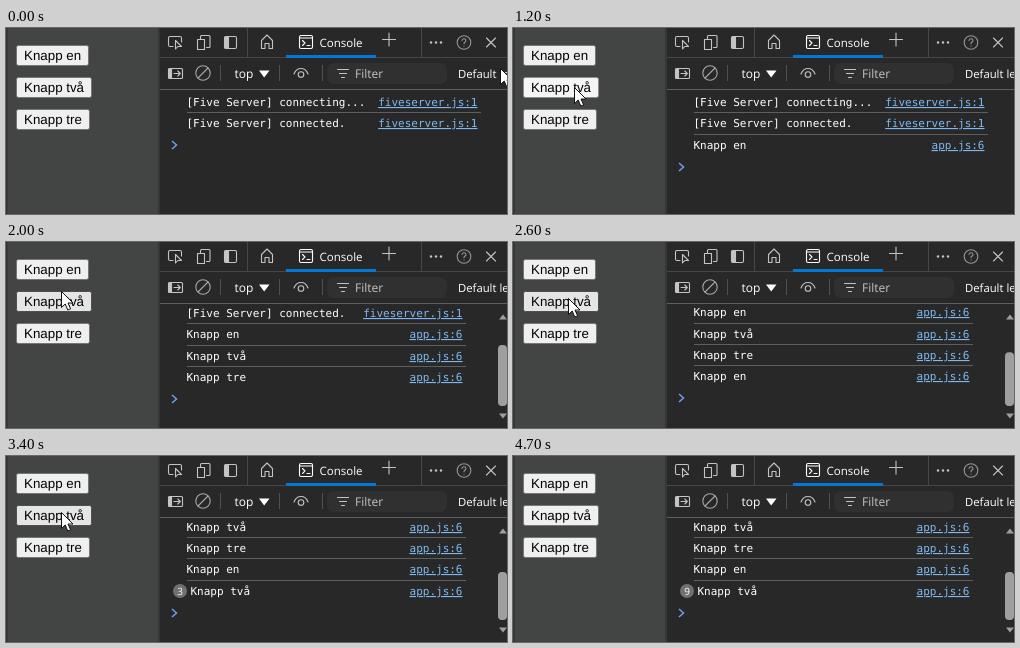
An HTML page for the animation above (5400 ms loop, 501 px wide and 186 px high).

```html
<!DOCTYPE html>
<html lang="sv">
<head>
<meta charset="utf-8">
<title>Knappar och konsol</title>
<style>
  html, body { margin: 0; width: 100%; height: 100%; overflow: hidden; background: #282828; }
  svg { display: block; width: 501px; height: 186px; }
  text { text-rendering: geometricPrecision; white-space: pre; }
  .ui { font-family: "Open Sans", "Noto Sans", sans-serif; fill: #fff; }
  .mono { font: 11px "DejaVu Sans Mono", monospace; fill: #fff; }
  .link { fill: #7db8f0; text-decoration: underline; text-anchor: end; }
  .btn { font: 13.333px "Liberation Sans", Arial, sans-serif; }
  .icon { fill: none; stroke: #c4c4c4; stroke-width: 1.1; stroke-linecap: round; stroke-linejoin: round; }
</style>
</head>
<body>
<svg viewBox="0 0 501 186">
  <clipPath id="view"><rect x="154" y="62" width="347" height="124"/></clipPath>

  <rect width="153" height="186" fill="#434444"/>
  <rect width="2" height="186" fill="#383838"/>
  <rect x="152" width="2" height="186" fill="#363636"/>
  <rect x="154" width="347" height="186" fill="#282828"/>

  <!-- tab bar -->
  <path d="M154 29.5H501M241.500 0V29M415.500 0V29" stroke="#474747"/>
  <path d="M154 61.5H501" stroke="#5e5e5e"/>
  <rect x="280" y="27" width="90" height="3" fill="#0078d4"/>
  <path d="M214.500 37V53M273.500 37V53M316.500 37V53" stroke="#505050"/>
  <g class="icon">
    <path d="M167 18.500H164Q162.500 18.500 162.500 17V10Q162.500 8.500 164 8.500H174Q175.500 8.500 175.500 10V14M169.500 12.500V21L171.800 18.500H175.500Z"/>
    <path d="M194.500 11V8.500Q194.500 7.500 195.500 7.500H203Q204 7.500 204 8.500V18.500Q204 19.500 203 19.500H200.500M191.500 11.500H198.500V21.500H191.500Z"/>
    <rect x="218.500" y="8.500" width="12" height="12" rx="1.500"/>
    <path d="M219 9H222.500V20H219Z" fill="#c4c4c4"/>
    <path d="M255.500 20.500V12.500L261 7L266.500 12.500V20.500H263V15.500H259V20.500Z"/>
    <path d="M293.500 9Q293.500 7.500 295 7.500H305Q306.500 7.500 306.500 9V19Q306.500 20.500 305 20.500H295Q293.500 20.500 293.500 19ZM293.500 10H306.500M296.500 12.500L299 15L296.500 17.500M301 17.500H304" stroke="#fff"/>
    <path d="M376.500 11.500H389.500M383 5V18"/>
    <g stroke="#969696">
      <circle cx="458" cy="14.500" r="6.800"/>
      <path d="M456 12.500Q456.200 10.800 458 10.800Q460 10.800 460 12.600Q460 13.600 458.800 14.300Q458 14.900 458 15.800M458 18V18.100"/>
    </g>
    <path d="M480.500 10L489.500 19M489.500 10L480.500 19"/>
  </g>
  <g fill="#c4c4c4">
    <circle cx="425" cy="14.500" r="1.200"/><circle cx="430" cy="14.500" r="1.200"/><circle cx="435" cy="14.500" r="1.200"/>
  </g>
  <text class="ui" x="313.500" y="18.500" font-size="11.500">Console</text>

  <!-- filter bar -->
  <rect x="321" y="35" width="120" height="21" rx="7" fill="#303030"/>
  <g class="icon">
    <rect x="162.500" y="40.500" width="14" height="10" rx="1"/>
    <path d="M163 41H165.500V50H163Z" fill="#c4c4c4"/>
    <path d="M168 45.500H174M171.800 43L174.300 45.500L171.800 48"/>
    <g stroke="#a8a8a8"><circle cx="197" cy="45" r="7.200"/><path d="M192 50L202 40"/></g>
    <path d="M288 46Q290 40.500 295 40.500T302 46"/><circle cx="295" cy="46.500" r="2.800"/>
    <path d="M331.500 41.500H342.500M333.500 45.500H340.500M335.500 49.500H338.500"/>
  </g>
  <path d="M253 42.500H263.500L258.200 49.500Z" fill="#fff"/>
  <g class="ui">
    <text x="228.500" y="49.500" font-size="12">top</text>
    <text x="349" y="49.500" font-size="12" fill="#c4c4c4">Filter</text>
    <text x="452" y="49.500" font-size="11.300">Default levels</text>
  </g>

  <g id="buttons"></g>
  <g id="console" clip-path="url(#view)"></g>
  <path id="cursor" d="M.5 .5V16.500L4.200 13L6.800 19L9.600 17.800L7 12H12Z" fill="#fff" stroke="#111"/>
</svg>
<script>
const LOOP = 5400, STEP = 100, PITCH = 64 / 3;
const $ = id => document.getElementById(id);

const buttons = [
  { label: 'Knapp en', y: 17, w: 73 },
  { label: 'Knapp två', y: 49, w: 76 },
  { label: 'Knapp tre', y: 81, w: 74 },
];

// Pointer tip: [time, x, y]
const path = [
  [0, 494, 40], [100, 455, 48], [200, 340, 56], [300, 205, 52], [400, 105, 37],
  [500, 67, 26], [900, 65, 27], [1000, 63, 34], [1200, 61, 59], [1300, 61, 59],
  [1600, 59, 88], [1800, 59, 89], [1900, 57, 72], [2000, 55, 49], [2100, 55, 28],
  [2300, 55, 27], [2400, 55, 35], [2500, 55, 48], [2600, 55, 56], [LOOP, 55, 56],
];
const GONE = 4700;

// Click release: [time, button]
const clicks = [
  [800, 0], [1300, 1], [1800, 2], [2300, 0], [2900, 1], [3200, 1], [3400, 1],
  [3700, 1], [3900, 1], [4100, 1], [4400, 1], [4600, 1], [4700, 1],
];

function tipAt(t) {
  const i = path.findIndex(p => p[0] > t);
  const [t0, x0, y0] = path[i - 1], [t1, x1, y1] = path[i];
  const k = (t - t0) / (t1 - t0);
  return [Math.round(x0 + (x1 - x0) * k), Math.round(y0 + (y1 - y0) * k)];
}

function drawButtons(t, [x, y]) {
  const pressed = clicks.some(c => c[0] === t + STEP);
  $('buttons').innerHTML = buttons.map(b => {
    const hover = t < GONE && x >= 10 && x < 10 + b.w && y >= b.y && y < b.y + 21;
    const [fill, edge] = !hover ? ['#efefef', '#767676']
      : pressed ? ['#f5f5f5', '#8d8d8d'] : ['#e5e5e5', '#4f4f4f'];
    return `<rect x="10.5" y="${b.y + .5}" width="${b.w - 1}" height="20" rx="2" fill="${fill}" stroke="${edge}"/>
      <text class="btn" x="18" y="${b.y + 15}">${b.label}</text>`;
  }).join('');
}

function logAt(t) {
  const rows = ['connecting...', 'connected.'].map(s =>
    ({ text: '[Five Server] ' + s, link: 'fiveserver.js:1', count: 1 }));
  for (const [time, b] of clicks) {
    if (time > t) break;
    const text = buttons[b].label, last = rows[rows.length - 1];
    if (last.text === text) last.count++;
    else rows.push({ text, link: 'app.js:6', count: 1 });
  }
  return rows;
}

function scrollbar(n) {
  const h = 1 / (.0142 + .0022 * (n - 4));
  return `<rect x="492" y="${164 - h}" width="9" height="${h}" rx="4" fill="#9f9f9f"/>
    <path d="M493 77.500L497 72.500L501 77.500ZM493 171.500L497 176.500L501 171.500Z" fill="#9f9f9f"/>`;
}

function drawConsole(t) {
  const rows = logAt(t), n = rows.length;
  const scroll = Math.max(0, Math.round(PITCH * n - 82.3) + .2);
  const right = scroll ? 456.5 : 471.5;
  // Pixel row at a distance below the middle of line i
  const rowY = (i, below = 0) => Math.floor(74.4 + PITCH * i - scroll + below);
  let out = rows.map((r, i) => {
    const y = rowY(i), many = r.count > 1;
    return (i < n - 1 ? `<rect x="181" y="${rowY(i, 10.35)}" width="${right + 3.5 - 181}" height="1" fill="#5e5e5e"/>` : '') +
      (many ? `<circle cx="174" cy="${y}" r="7" fill="#707070"/>
        <text class="ui" x="174" y="${y + 3.5}" font-size="10" text-anchor="middle">${r.count}</text>` : '') +
      `<text class="mono" x="${many ? 184.5 : 180.5}" y="${y + 4}">${r.text}</text>
       <text class="mono link" x="${right}" y="${y + 4}">${r.link}</text>`;
  }).join('');
  out += `<path d="M166 ${rowY(n, .6) - 4}l4.500 4l-4.500 4" fill="none" stroke="#6f9ff0" stroke-width="1.500"/>`;
  $('console').innerHTML = out + (scroll ? scrollbar(n) : '');
}

let shown = -1;
function frame() {
  const t = Math.floor(performance.now() % LOOP / STEP) * STEP;
  if (t !== shown) {
    shown = t;
    const tip = tipAt(t);
    drawButtons(t, tip);
    drawConsole(t);
    $('cursor').setAttribute('transform', `translate(${tip})`);
    $('cursor').setAttribute('visibility', t < GONE ? 'visible' : 'hidden');
  }
  requestAnimationFrame(frame);
}
frame();
</script>
</body>
</html>
```
